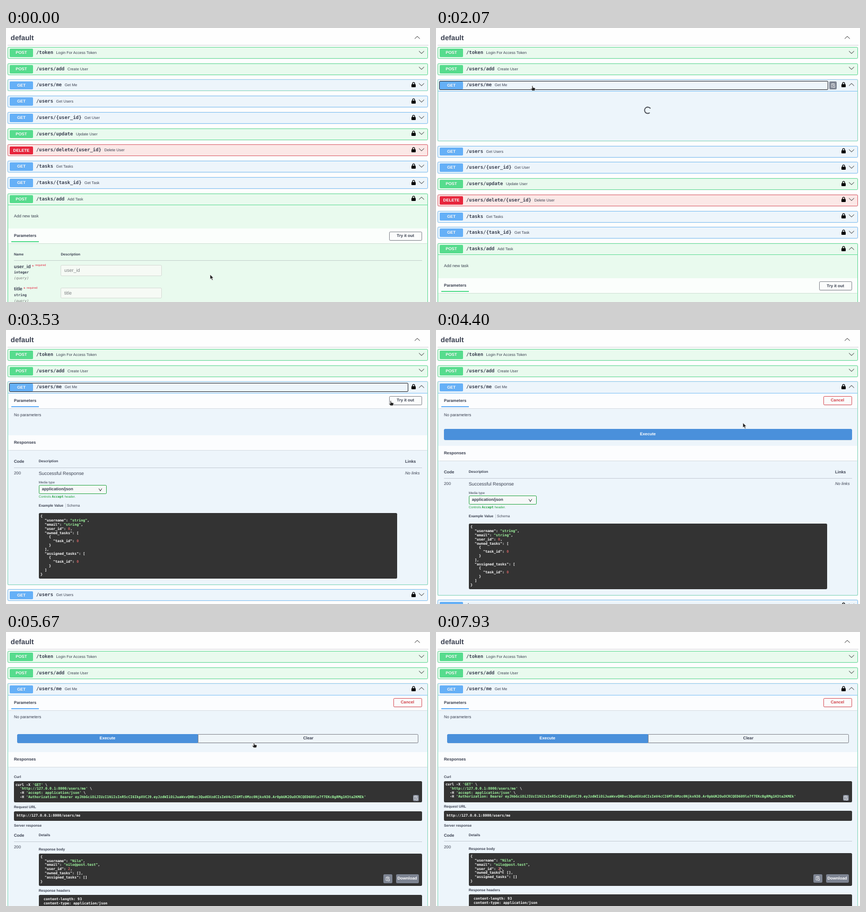
Write an HTML page that moves like this. It is 800 px wide and 518 px high and loops after 8000 ms.

```html
<!DOCTYPE html>
<html lang="en">
<head>
<meta charset="utf-8">
<title>API docs</title>
<style>
html, body { margin: 0; width: 100%; height: 100%; overflow: hidden; background: #fefefe; }
#stage {
  position: relative; width: 800px; height: 518px; overflow: hidden; background: #fefefe;
  color: #3b4151; font: 7.78px/10px "Liberation Sans", Arial, sans-serif;
  text-rendering: geometricPrecision;
}
#stage div, #stage p, #stage pre, #stage svg { position: absolute; margin: 0; box-sizing: border-box; white-space: pre; }
#stage .group { left: 0; top: 0; width: 0; height: 0; }
#stage .hide { display: none; }
.bold { font-weight: 700; }
.title { font-size: 13.33px; }
.small { font-size: 6.67px; }
.tiny { font-size: 6.2px; }
.micro { font-size: 5.56px; }
.big { font-size: 8.89px; }
.mono, pre, code { font-family: "DejaVu Sans Mono", monospace; font-weight: 700; }
.red { color: #e5344c; }
.query { font-style: italic; font-weight: 400; color: #777; }
.green { color: #23a33c; }

.get { --c: #65b0f7; --line: #7fc1f5; --bg: #edf5fb; }
.post { --c: #56dc8d; --line: #62dd97; --bg: #e9faee; }
.delete { --c: #e8263d; --line: #e0656f; --bg: #fbe8e7; }
.row { left: 3px; width: 793px; height: 22px; border: 1px solid var(--line); border-radius: 2.2px; background: var(--bg); box-shadow: 0 0 1.7px rgba(0,0,0,.19); }
.row.me { border-color: #8fcbee #85d9bf #85d9bf; }
.badge { left: 2.7px; top: 2.2px; width: 44.5px; height: 15.6px; border-radius: 1.7px; background: var(--c); color: #fff; font-weight: 700; line-height: 15.6px; text-align: center; text-shadow: 0 .6px 0 rgba(0,0,0,.1); }
.path { left: 53px; top: 5px; }
.path .mono { margin-right: 5.56px; }
.path small { font-size: 7.22px; }
.fill { background: var(--c); }
.line { background: var(--line); }
.head { background: rgba(255,255,255,.82); box-shadow: 0 .6px 1px rgba(0,0,0,.1); }
.rule { background: rgba(59,65,81,.22); }
.btn { border: 1.3px solid #85888f; border-radius: 2.2px; background: #fbfcfc; font-weight: 700; box-shadow: 0 .6px 1px rgba(0,0,0,.1); display: flex; align-items: center; justify-content: center; }
.cancel { border-color: #d9545c; color: #d23f47; }
.run { background: #4a90db; border-color: #4a90db; color: #fff; }
.busy { background: #86bdf0; border-color: #86bdf0; }
.clear { background: #eff5f9; }
.grey { background: #7d8492; border: 0; color: #fff; }
.input { border: 1px solid #d6dcd6; border-radius: 2.2px; background: #f6faf5; color: #7d8182; font-size: 9px; line-height: 18px; padding-left: 6px; }
.select { border: 1.7px solid #2fa84a; border-radius: 2.2px; background: #f6f8f8; font-weight: 700; line-height: 13.6px; padding-left: 5px; }
.dark { background: #333; border-radius: 2.2px; }
pre { color: #fff; font-size: 6.67px; line-height: 7.82px; }
pre i { color: #a2fca2; font-style: normal; }
pre b { color: #d36363; }
#run { border-radius: 2.2px 0 0 2.2px; }
#clear { border-radius: 0 2.2px 2.2px 0; }
#focus { left: 6px; top: 100px; height: 16.5px; border: 1.6px solid #26282e; border-radius: 2px; }
#ring { left: 383px; top: 232.5px; width: 36px; height: 36px; border: 1.2px solid rgba(85,85,85,.14); border-top-color: rgba(85,85,85,.8); border-radius: 50%; }
#cursor { left: 0; top: 0; width: 0; height: 0; }
#cursor svg { overflow: visible; }
</style>
</head>
<body>
<div id="stage"></div>
<script>
const stage = document.getElementById('stage');
const LOOP = 8000;

// Markup helpers; y is the centre line of a text
const text = (x, y, s, cls = '') => `<p class="${cls}" style="left:${x}px;top:${y - 5}px">${s}</p>`;
const box = (x, y, w, h, cls = '', s = '', more = '') =>
  `<div class="${cls}" style="left:${x}px;top:${y}px;width:${w}px;height:${h}px" ${more}>${s}</div>`;
const group = (s, more = '') => `<div class="group" ${more}>${s}</div>`;
const svg = (x, y, w, h, s, more = '') =>
  `<svg style="left:${x}px;top:${y}px" width="${w}" height="${h}" fill="none" ${more}>${s}</svg>`;
const chevron = (x, y, up, r = 4.8) => svg(x - 7, y - 5, 14, 10,
  `<path d="M${7 - r} ${up ? 7.3 : 2.7}L7 ${up ? 2.7 : 7.3}L${7 + r} ${up ? 7.3 : 2.7}" stroke="#2a2a2a"/>`);
const lock = (x, y) => svg(x - 4, y - 5, 8, 10,
  '<path d="M2 5V2.8a2 2 0 0 1 4 0V5" stroke="#000" stroke-width="1.3"/><rect y="4.2" width="8" height="5.8" rx="1" fill="#000"/>');
const clip = (x, y, w, h, more = '') => box(x, y, w, h, 'btn grey',
  svg(w / 2 - 4, h / 2 - 4.5, 8, 9, '<path d="M3 8H1V1.5h6V4M2.8 1.2h2.4M2.5 3.5h3M4 5h3.5v3.5H4z" stroke="#fff" stroke-width=".8"/>'), more);
const code = (x, y, s) => `<pre style="left:${x}px;top:${y - 3.9}px">${s}</pre>`;
const paint = s => s
  .replace(/("[^"]*")(:?)/g, (m, q, colon) => colon ? m : `<i>${q}</i>`)
  .replace(/: (\d)/g, ': <b>$1</b>');
const header = (y, title) => box(4, y, 791, 28, 'head') + text(15, y + 14, title, 'bold');

// Operations
const ROWS = [
  ['post', '/token', 'Login For Access Token'], ['post', '/users/add', 'Create User'],
  ['get', '/users/me', 'Get Me'], ['get', '/users', 'Get Users'],
  ['get', '/users/{user_id}', 'Get User'], ['post', '/users/update', 'Update User'],
  ['delete', '/users/delete/{user_id}', 'Delete User'], ['get', '/tasks', 'Get Tasks'],
  ['get', '/tasks/{task_id}', 'Get Task'], ['post', '/tasks/add', 'Add Task'],
];
const ME = 2, ADD = 9;
const rowY = i => 47 + 30.73 * i;

function row([kind, path, note], i) {
  const y = rowY(i), open = i === ADD;
  const shell = `<div class="row ${kind} ${i === ME ? 'me' : ''}" style="top:${y - 11}px;${open ? 'height:400px' : ''}">` +
    `<div class="badge">${kind.toUpperCase()}</div>` +
    `<p class="path"><span class="mono big">${path}</span><small>${note}</small></p></div>`;
  const arrow = i === ME
    ? group(chevron(784, y - 1.3), 'data-on="0"') + group(chevron(784, y - 1.3, true), 'data-on="12345"')
    : chevron(784, y - 1.3, open);
  const more = i < ME ? '' : lock(769, y - 1.3) + clip(741.5, y - 7.3, 14, 14.5, `data-hover="${i}"`);
  return shell + arrow + more;
}

const field = (y, name, type, w) =>
  text(15, y, name, 'bold big') + text(15 + w, y, '*', 'red big') +
  text(21 + w, y - 1.5, 'required', 'red micro') +
  text(15, y + 11.7, type, 'mono small') + text(15, y + 22.7, '(query)', 'mono small query') +
  box(103, y - 2.3, 190.5, 20.5, 'input', name);

const addBody =
  box(4, 334, 791, 1, 'post line') + text(15, 355.5, 'Add new task') + header(379, 'Parameters') +
  box(10, 403, 52, 2, 'post fill') + box(723, 385, 61.5, 16.5, 'btn', 'Try it out') +
  text(15, 428.5, 'Name', 'bold small') + text(103.5, 428.5, 'Description', 'bold small') +
  box(15, 439, 769.5, 1, 'rule') + field(450.5, 'user_id', 'integer', 34) + field(493, 'title', 'string', 18);

const sample = `{
  "username": "string",
  "email": "string",
  "user_id": 0,
  "owned_tasks": [
    {
      "task_id": 0
    }
  ],
  "assigned_tasks": [
    {
      "task_id": 0
    }
  ]
}`;

const docs =
  header(198.5, 'Responses') + text(15, 249, 'Code', 'bold') + text(61.7, 249, 'Description', 'bold small') +
  text(753, 249, 'Links', 'bold') + box(15, 260, 769.5, 1, 'rule') + text(15, 271, '200') +
  text(61.7, 271, 'Successful Response', 'big') + text(753, 271, '<em>No links</em>') +
  text(61.7, 288.7, 'Media type', 'tiny') + box(61.7, 293, 128.5, 17, 'select', 'application/json') +
  chevron(178, 301.5, false, 2.8) + text(61.7, 315.5, 'Controls <code>Accept</code> header.', 'tiny green') +
  text(61.7, 332.5, 'Example Value', 'bold small') + box(111.5, 328, 1, 8, 'rule') +
  text(115, 332.5, 'Schema', 'small') + box(62, 346, 675.5, 124, 'dark') + code(65, 353.2, paint(sample));

const token = 'eyJhbGciOiJIUzI1NiIsInR5cCI6IkpXVCJ9.eyJzdWIiOiJuaWxvQHBvc3QudGVzdCIsImV4cCI6MTc0Mzc0NjkxN30.' +
  'Ar0pbUK2OuOCRCQED609lo7f7EKcBgRMg1H3ta2KMEk';
const url = 'http://127.0.0.1:8000/users/me';
const curl = `curl -X <i>'GET'</i> \\
  <i>'${url}'</i> \\
  -H <i>'accept: application/json'</i> \\
  -H <i>'Authorization: Bearer ${token}'</i>`;
const reply = `{
  "username": "Nilo",
  "email": "nilo@post.test",
  "user_id": 2,
  "owned_tasks": [],
  "assigned_tasks": []
}`;

const result =
  header(226.5, 'Responses') + text(15, 274.7, 'Curl', 'bold small') + box(15, 281.5, 769.5, 40, 'dark') +
  code(18, 288.9, curl) + clip(767.5, 307.5, 11, 11.5) + text(15, 331.2, 'Request URL', 'bold small') +
  box(15, 338, 769.5, 18.5, 'dark') + code(20, 347.5, url) +
  text(15, 366.5, 'Server response', 'bold small') + text(15, 384.5, 'Code', 'bold') +
  text(61.7, 384.5, 'Details', 'bold small') + box(15, 395, 769.5, 1, 'rule') + text(15, 406.5, '200') +
  text(61.7, 411.3, 'Response body', 'bold small') + box(62, 418, 722.5, 61.5, 'dark') +
  code(65, 425, paint(reply)) + clip(711.5, 457.5, 17.5, 16.5) +
  box(735.5, 457.5, 43, 16.5, 'btn grey', 'Download') +
  text(61.7, 489, 'Response headers', 'bold small') + box(62, 496, 722.5, 60, 'dark') +
  code(71, 505, 'content-length: 93\ncontent-type: application/json');

const loading = svg(391, 147, 17, 17,
  '<circle cx="8.5" cy="8.5" r="6" stroke="#4a4d55" stroke-width="1.8" stroke-dasharray="28.3 9.4"/>', 'id="spin"');

const meBody =
  group(box(4, 119, 791, 1, 'get line'), 'data-on="12345"') + group(loading, 'data-on="1"') +
  group(header(120, 'Parameters') + box(10, 144, 52, 2, 'get fill') + text(15, 160.5, 'No parameters'), 'data-on="2345"') +
  group(box(723, 125, 61.5, 16.5, 'btn', 'Try it out'), 'data-on="2"') +
  group(box(730.5, 125, 54, 16.5, 'btn cancel', 'Cancel'), 'data-on="345"') +
  group(box(15, 187, 769.5, 20.5, 'btn run', 'Execute'), 'data-on="3"') +
  group(box(15, 187, 769.5, 20.5, 'btn run busy', 'Execute') + '<div id="ring"></div>' +
    text(386.5, 250.3, 'LOADING', 'bold micro'), 'data-on="4"') +
  group(docs, 'data-on="234" id="docs"') +
  group(box(20.5, 192.7, 0, 17.3, 'btn run', 'Execute', 'id="run"') +
    box(0, 192.7, 0, 17.3, 'btn clear', 'Clear', 'id="clear"'), 'data-on="5"') +
  group(result, 'data-on="5" id="result"');

// Pointer shapes, each with its hot spot at 0,0
const pointer = (name, s) => svg(0, 0, 1, 1, s, `data-shape="${name}"`);
const ink = 'fill="#222" stroke="#fff" stroke-width=".7"';
const pointers =
  pointer('arrow', `<path d="M0 0V9.2L2.2 7.3L3.8 11L5.5 10.2L3.9 6.7H6.8Z" ${ink}/>`) +
  pointer('hand', `<path d="M-1 0Q0-1.2 .9 0V3L4.6 3.8Q5.6 4.2 5.3 5.7L4.4 9H-.6L-3.4 5.6Q-3.4 4.4-2.2 4.7L-1 5.6Z" ${ink}/>`) +
  pointer('no', '<circle r="4.6" fill="#fff"/><circle r="3.5" stroke="#222" stroke-width="1.7" fill="#ddd"/><path d="M-2.4-2.4L2.4 2.4" stroke="#222" stroke-width="1.6"/>');

stage.innerHTML =
  text(8.8, 18.7, 'default', 'bold title') + chevron(776, 17.7, true) + box(3, 32, 794, 1, 'rule') +
  ROWS.slice(0, ME + 1).map(row).join('') + meBody + '<div id="focus"></div>' +
  group(ROWS.slice(ME + 1).map((r, i) => row(r, i + ME + 1)).join('') + addBody, 'id="rest"') +
  `<div id="cursor">${pointers}</div>`;

const $ = id => document.getElementById(id);
const all = sel => [...stage.querySelectorAll(sel)];
const staged = all('[data-on]'), hovers = all('[data-hover]'), shapes = all('[data-shape]');
const meRow = stage.querySelector('.row.me');
const show = (el, on) => el.classList.toggle('hide', !on);

// Phases: closed, loading docs, docs, try out, executing, answered
const STARTS = [0, 1800, 2330, 3870, 5270, 5600];
const GROWTH = [0, 94.4, 362.2, 382.2, 447.2, 700];
const PATH = [
  [0, 385, 466], [330, 385, 466], [600, 340, 330], [870, 340, 330], [1670, 182, 109.5], [2330, 182, 109.5],
  [3130, 578, 188], [3200, 578, 188], [3530, 726, 134], [3730, 756, 131], [4000, 756, 131], [4400, 579, 175.5],
  [4670, 500, 194], [4730, 500, 194], [4930, 470.5, 203.5], [5600, 470.5, 203.5], [5670, 468, 209.8],
  [6000, 465, 240], [6730, 465, 240], [7000, 185, 346], [7270, 185, 346], [7480, 282, 312],
  [7800, 114, 452], [7930, 121, 445], [LOOP, 121, 445],
];

function pointAt(t) {
  const n = PATH.findIndex(k => k[0] > t);
  const [t0, x0, y0] = PATH[n - 1], [t1, x1, y1] = PATH[n];
  const p = (t - t0) / (t1 - t0), e = p * p * (3 - 2 * p);
  return [x0 + (x1 - x0) * e, y0 + (y1 - y0) * e];
}

function shapeAt(x, y, phase, overRow) {
  if (phase === 4) return 'no';
  const onTry = (phase === 2 || phase === 3) && x > 722 && y > 125 && y < 142;
  const onRun = (phase === 3 && y > 187 && y < 208) || (phase === 5 && y > 192 && y < 211);
  return overRow >= 0 || onTry || onRun ? 'hand' : 'arrow';
}

function draw(t) {
  const phase = STARTS.filter(s => s <= t).length - 1;
  const grow = GROWTH[phase];
  const [x, y] = pointAt(t);
  const overRow = ROWS.findIndex((r, i) => Math.abs(y - rowY(i) - (i > ME ? grow : 0)) < 10.5);

  staged.forEach(el => show(el, el.dataset.on.includes(phase)));
  hovers.forEach(el => show(el, +el.dataset.hover === overRow));
  meRow.style.height = 22 + grow + 'px';
  $('rest').style.top = grow + 'px';
  $('docs').style.top = [0, 0, 0, 20, 85, 0][phase] + 'px';
  $('result').style.top = t < 6530 ? '.6px' : 0;

  show($('focus'), t >= 1730 && t < 3870);
  $('focus').style.width = (overRow === ME ? 734 : 752.5) + 'px';

  $('spin').style.transform = `rotate(${t * .36 + 25}deg)`;
  $('ring').style.transform = `rotate(${t * .36 - 124}deg)`;
  const p = Math.min(1, Math.max(0, (t - 5600) / 300));
  const split = 345 + 55 * (1 - (1 - p) ** 1.4);
  $('run').style.width = split - 20.5 + 'px';
  $('clear').style.left = split + 'px';
  $('clear').style.width = 778.5 - split + 'px';

  $('cursor').style.transform = `translate(${x}px,${y}px)`;
  const shape = shapeAt(x, y, phase, overRow);
  shapes.forEach(el => show(el, el.dataset.shape === shape));
}

const start = performance.now();
function tick() {
  draw((performance.now() - start) % LOOP);
  requestAnimationFrame(tick);
}
tick();
</script>
</body>
</html>
```
